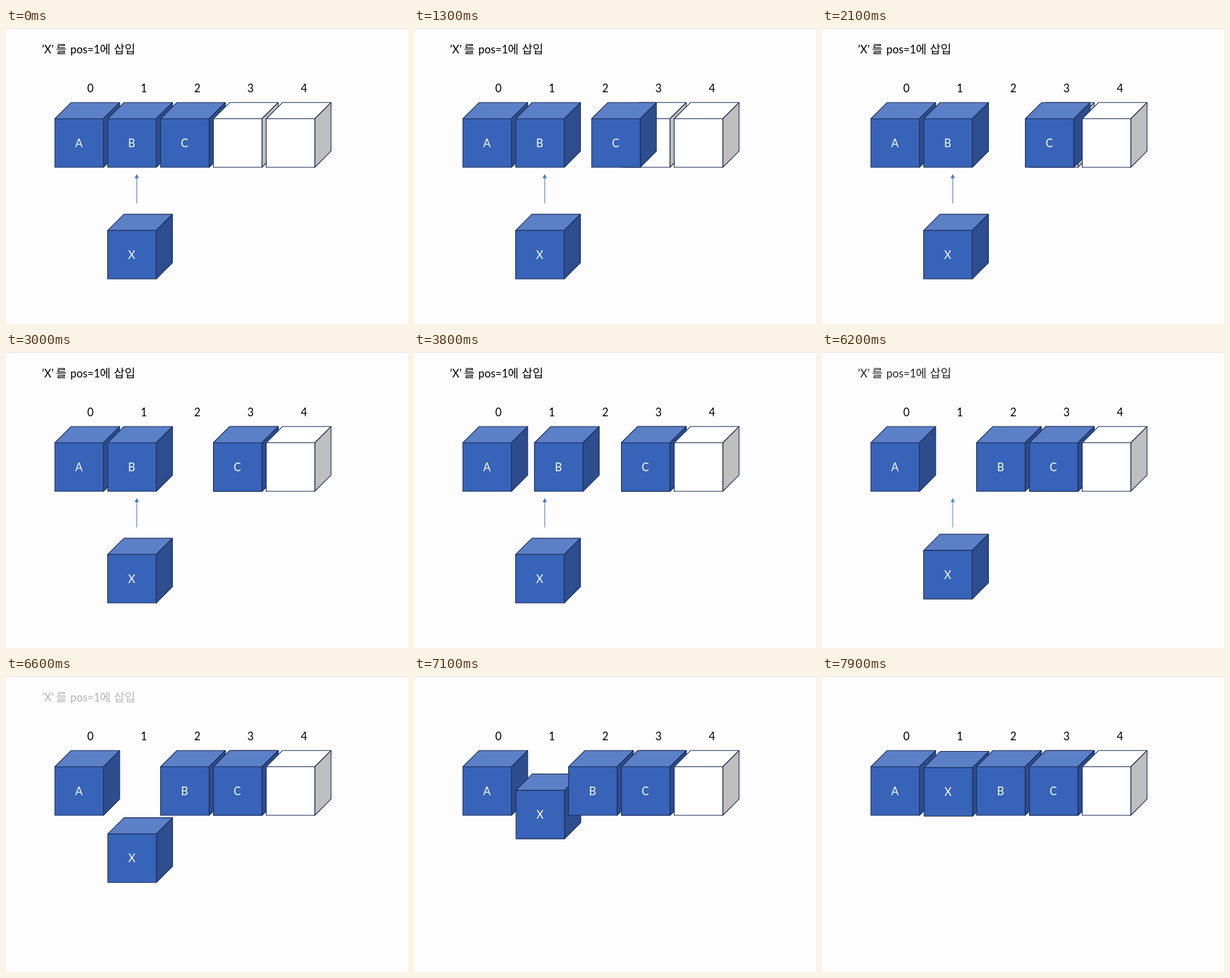
An HTML page with a canvas that plays this animation: 600 by 442 pixels, repeating every 8000 ms.

```html
<!DOCTYPE html>
<html lang="ko">
<head>
<meta charset="utf-8">
<title>배열 삽입</title>
<style>
html, body { margin: 0; width: 100%; height: 100%; overflow: hidden; background: #fdfdfd; }
canvas { display: block; }
</style>
</head>
<body>
<canvas id="stage" width="600" height="442"></canvas>
<script>
const ctx = document.getElementById('stage').getContext('2d');
const LOOP = 8000, STEP = 100;
const LATIN = '16.4px Lato, "Open Sans", sans-serif';
const HANGUL = '17.4px "Noto Sans CJK KR", "Noto Sans CJK", sans-serif';
const SIDE = 72.5, DEPTH = 24.2, ROW = 135.5;
const BLUE = ['#3763b8', '#5b80c8', '#2d4d8f'];
const EMPTY = ['#ffffff', '#ffffff', '#bfbfbf'];
const slot = i => 73 + 78.85 * i;

// cubic-bezier(.25, .1, .25, 1)
function ease(x) {
  if (x <= 0) return 0;
  if (x >= 1) return 1;
  const curve = (a, b, s) => 3 * a * s * (1 - s) ** 2 + 3 * b * s * s * (1 - s) + s ** 3;
  let lo = 0, hi = 1;
  for (let i = 0; i < 24; i++) {
    const mid = (lo + hi) / 2;
    if (curve(.25, .25, mid) < x) lo = mid; else hi = mid;
  }
  return curve(.1, 1, lo);
}
const progress = (t, start, length) => ease((t - start) / length);
const mix = (a, b, p) => a + (b - a) * p;

function text(str, x, y, color = '#000', font = LATIN, align = 'center') {
  ctx.font = font;
  ctx.fillStyle = color;
  ctx.textAlign = align;
  ctx.fillText(str, x, y);
}

function face(color, points) {
  ctx.beginPath();
  points.forEach(([x, y]) => ctx.lineTo(x, y));
  ctx.closePath();
  ctx.fillStyle = color;
  ctx.fill();
  ctx.stroke();
}

function cube(x, y, [front, top, side], label) {
  const r = x + SIDE, b = y + SIDE, d = DEPTH;
  ctx.strokeStyle = '#1b2d55';
  ctx.lineWidth = 1.1;
  ctx.lineJoin = 'round';
  face(top, [[x, y], [x + d, y - d], [r + d, y - d], [r, y]]);
  face(side, [[r, y], [r + d, y - d], [r + d, b - d], [r, b]]);
  face(front, [[x, y], [r, y], [r, b], [x, b]]);
  if (label) text(label, x + SIDE / 2 - .5, y + 42.5, '#fff');
}

function title() {
  text('’X’', 53.5, 38.3, '#000', LATIN, 'left');
  text('를', 74.5, 38.3, '#000', HANGUL, 'left');
  text('pos=1', 96, 38.3, '#000', LATIN, 'left');
  text('에', 140, 38.3, '#000', HANGUL, 'left');
  text('삽입', 161, 38.3, '#000', HANGUL, 'left');
}

function arrow() {
  ctx.fillStyle = '#4472c4';
  ctx.fillRect(194.6, 223, 1, 39);
  ctx.beginPath();
  ctx.moveTo(195.1, 218);
  ctx.lineTo(198.2, 224.2);
  ctx.lineTo(192, 224.2);
  ctx.fill();
}

function draw(t) {
  ctx.fillStyle = '#fdfdfd';
  ctx.fillRect(0, 0, 600, 442);
  ctx.fillStyle = '#e2e2e2';
  ctx.fillRect(0, 0, 600, 1);

  ctx.globalAlpha = Math.max(0, Math.min(1, (6800 - t) / 700));
  title();
  arrow();
  ctx.globalAlpha = 1;

  for (let i = 0; i < 5; i++) text(i, 126 + 79.7 * i, 95.7);

  const moveC = progress(t, 774, 2000);
  const moveB = progress(t, 3345, 2015);
  const moveX = progress(t, 6090, 2080);
  const drawC = () => cube(mix(slot(2), slot(3), moveC), ROW, BLUE, 'C');

  cube(slot(0), ROW, BLUE, 'A');
  cube(mix(151.7, 152.4, moveX), mix(302.3, 135.1, moveX), BLUE, 'X');
  cube(mix(slot(1), slot(2), moveB), ROW, BLUE, 'B');
  if (!moveC) drawC();
  cube(slot(3), ROW, EMPTY);
  if (moveC) drawC();
  cube(slot(4), ROW, EMPTY);
}

const begin = performance.now();
function tick() {
  const t = (performance.now() - begin) % LOOP;
  draw(Math.floor(t / STEP) * STEP);
  requestAnimationFrame(tick);
}
tick();
</script>
</body>
</html>
```
